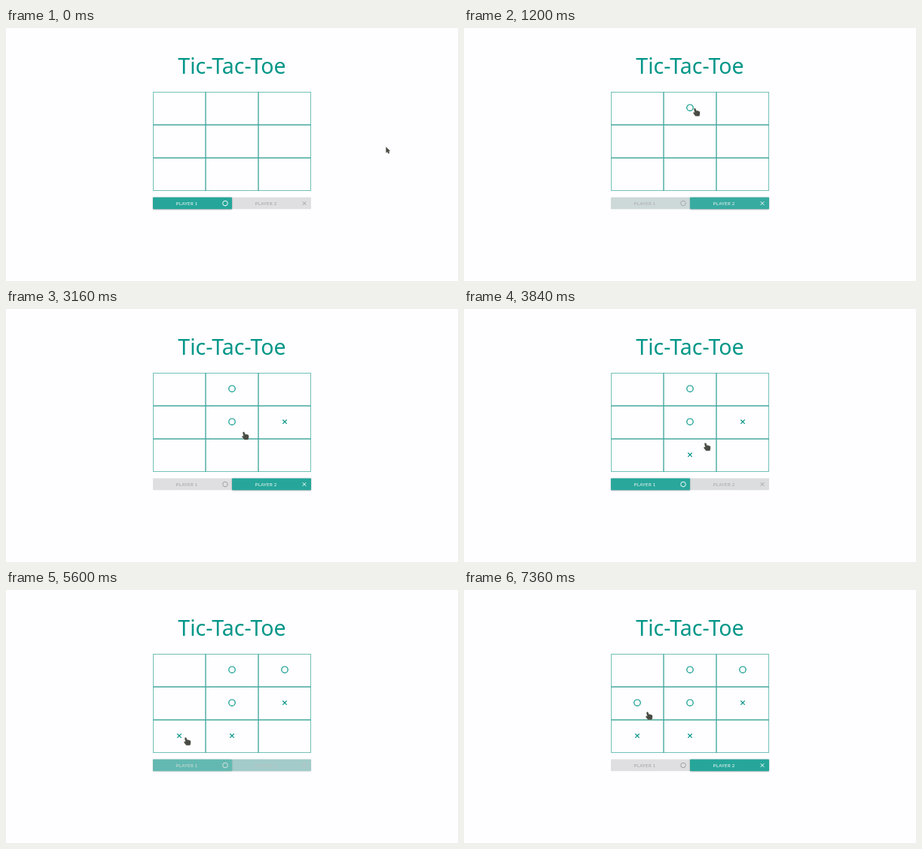
Write an HTML page with a canvas that moves like this. It is 600 px wide and 337 px high and loops after 7.4 s.

```html
<!DOCTYPE html>
<html lang="en">
<head>
<meta charset="utf-8">
<title>Tic-Tac-Toe</title>
<style>
html, body { margin: 0; width: 100%; height: 100%; overflow: hidden; background: #fefdff; }
canvas { display: block; width: 600px; height: 337px; }
</style>
</head>
<body>
<canvas id="stage"></canvas>
<script>
const LOOP = 7400;
const TEAL = '#009688';
const ACTIVE = [38, 166, 154], IDLE = [223, 222, 224];
const WHITE = [255, 255, 255], GREY = [160, 160, 160];

// Each move: time, column, row; players alternate, circle first.
const moves = [
  [950, 1, 0], [1820, 2, 1], [2720, 1, 1], [3510, 1, 2],
  [4445, 2, 0], [5445, 0, 2], [6440, 0, 1]
];
const FADE = 400;

// Pointer trips: start, end, destination.
const home = [504, 158];
const trips = [
  [290, 810, 304, 106.5], [1230, 1610, 350, 150], [2160, 2620, 308, 148],
  [3040, 3280, 318, 178], [3900, 4360, 351, 121], [4830, 5390, 236, 196],
  [5840, 6420, 241, 159], [7040, 7120, 241, 161.5], [7320, 7360, 241, 162]
];

const canvas = document.getElementById('stage');
const ctx = canvas.getContext('2d');
const ratio = window.devicePixelRatio || 1;
canvas.width = 600 * ratio;
canvas.height = 337 * ratio;
ctx.scale(ratio, ratio);

const clamp = v => Math.max(0, Math.min(1, v));
const lerp = (a, b, k) => a + (b - a) * k;
const smooth = k => k * k * (3 - 2 * k);
const mix = (a, b, k) => `rgb(${a.map((v, i) => Math.round(lerp(v, b[i], k)))})`;

// cubic-bezier(.25, .1, .25, 1), solved by bisection
function ease(x) {
  if (x <= 0 || x >= 1) return clamp(x);
  const curve = (u, a, b) => 3 * u * (1 - u) ** 2 * a + 3 * u * u * (1 - u) * b + u ** 3;
  let lo = 0, hi = 1;
  for (let i = 0; i < 20; i++) {
    const mid = (lo + hi) / 2;
    if (curve(mid, .25, .25) < x) lo = mid; else hi = mid;
  }
  return curve(lo, .1, 1);
}

function line(x1, y1, x2, y2) {
  ctx.beginPath();
  ctx.moveTo(x1, y1);
  ctx.lineTo(x2, y2);
  ctx.stroke();
}

function ring(x, y, r) {
  ctx.beginPath();
  ctx.arc(x, y, r, 0, Math.PI * 2);
  ctx.stroke();
}

function cross(x, y, r) {
  line(x - r, y - r, x + r, y + r);
  line(x + r, y - r, x - r, y + r);
}

function drawBoard(t) {
  ctx.fillStyle = TEAL;
  ctx.textAlign = 'center';
  ctx.font = '28.5px "Noto Sans", sans-serif';
  ctx.fillText('Tic-Tac-Toe', 300, 61);

  ctx.lineWidth = 1;
  ctx.strokeStyle = '#72c2b8';
  ctx.strokeRect(195.5, 85.5, 209, 131);
  ctx.strokeStyle = '#45aa9f';
  ctx.lineWidth = 1.4;
  for (const i of [1, 2]) {
    line(195 + i * 70, 85, 195 + i * 70, 217);
    line(195, 85 + i * 44, 405, 85 + i * 44);
  }

  ctx.strokeStyle = TEAL;
  ctx.lineWidth = 1.2;
  moves.forEach(([at, col, row], i) => {
    if (t < at) return;
    const x = 230 + col * 70, y = 106 + row * 44;
    if (i % 2) cross(x, y + .2, 2.7); else ring(x, y + .2, 4.2);
  });
}

function drawTab(player, on) {
  const x = 195 + player * 105;
  ctx.save();
  ctx.shadowColor = `rgba(0, 0, 0, ${.35 * on})`;
  ctx.shadowBlur = 2 * ratio;
  ctx.shadowOffsetY = .6 * ratio;
  ctx.fillStyle = mix(IDLE, ACTIVE, on);
  ctx.beginPath();
  ctx.roundRect(x, 225.5, 105, 15.7, .8);
  ctx.fill();
  ctx.restore();

  const ink = mix(GREY, WHITE, on);
  ctx.fillStyle = ctx.strokeStyle = ink;
  ctx.font = '6px Lato, sans-serif';
  ctx.letterSpacing = '0.3px';
  ctx.fillText('PLAYER ' + (player + 1), x + 45.2, 235.6);
  ctx.letterSpacing = '0px';
  ctx.lineWidth = 1;
  if (player) cross(x + 96, 233.5, 2.3); else ring(x + 96, 233.5, 3.3);
}

function drawTabs(t) {
  let second = 0;
  moves.forEach(([at], i) => {
    if (t >= at) second = lerp(second, i % 2 ? 0 : 1, ease((t - at) / FADE));
  });
  const order = second > .5 ? [0, 1] : [1, 0];
  for (const p of order) drawTab(p, p ? second : 1 - second);
}

function drawPointer(t) {
  let [x, y] = home;
  for (const [from, to, tx, ty] of trips) {
    const k = smooth(clamp((t - from) / (to - from)));
    x = lerp(x, tx, k);
    y = lerp(y, ty, k);
  }
  const arrow = x > 405;
  const shape = arrow
    ? 'M.5 .5V8.2L2.2 6.8L3.4 9.3L5 8.6L3.8 6.2L6 5.9Z'
    : 'M1.6 .8Q2.6 0 3.3 1L4.5 4Q5.6 3.2 6.2 4.1Q7.3 3.5 7.8 4.5Q8.8 4.2 9 5.5V8.2L8.3 10.7H3.3L.6 7.2Q0 6 1.2 5.8L2.5 6.5L1.4 2Z';
  const path = new Path2D(shape);
  ctx.save();
  ctx.translate(x, y);
  ctx.lineJoin = 'round';
  ctx.lineWidth = .8;
  ctx.strokeStyle = '#b9bcb4';
  ctx.stroke(path);
  ctx.fillStyle = '#474b43';
  ctx.fill(path);
  ctx.restore();
}

function draw(t) {
  ctx.fillStyle = '#fefdff';
  ctx.fillRect(0, 0, 600, 337);
  drawBoard(t);
  drawTabs(t);
  drawPointer(t);
}

const start = performance.now();
function tick() {
  draw((performance.now() - start) % LOOP);
  requestAnimationFrame(tick);
}
tick();
</script>
</body>
</html>
```
